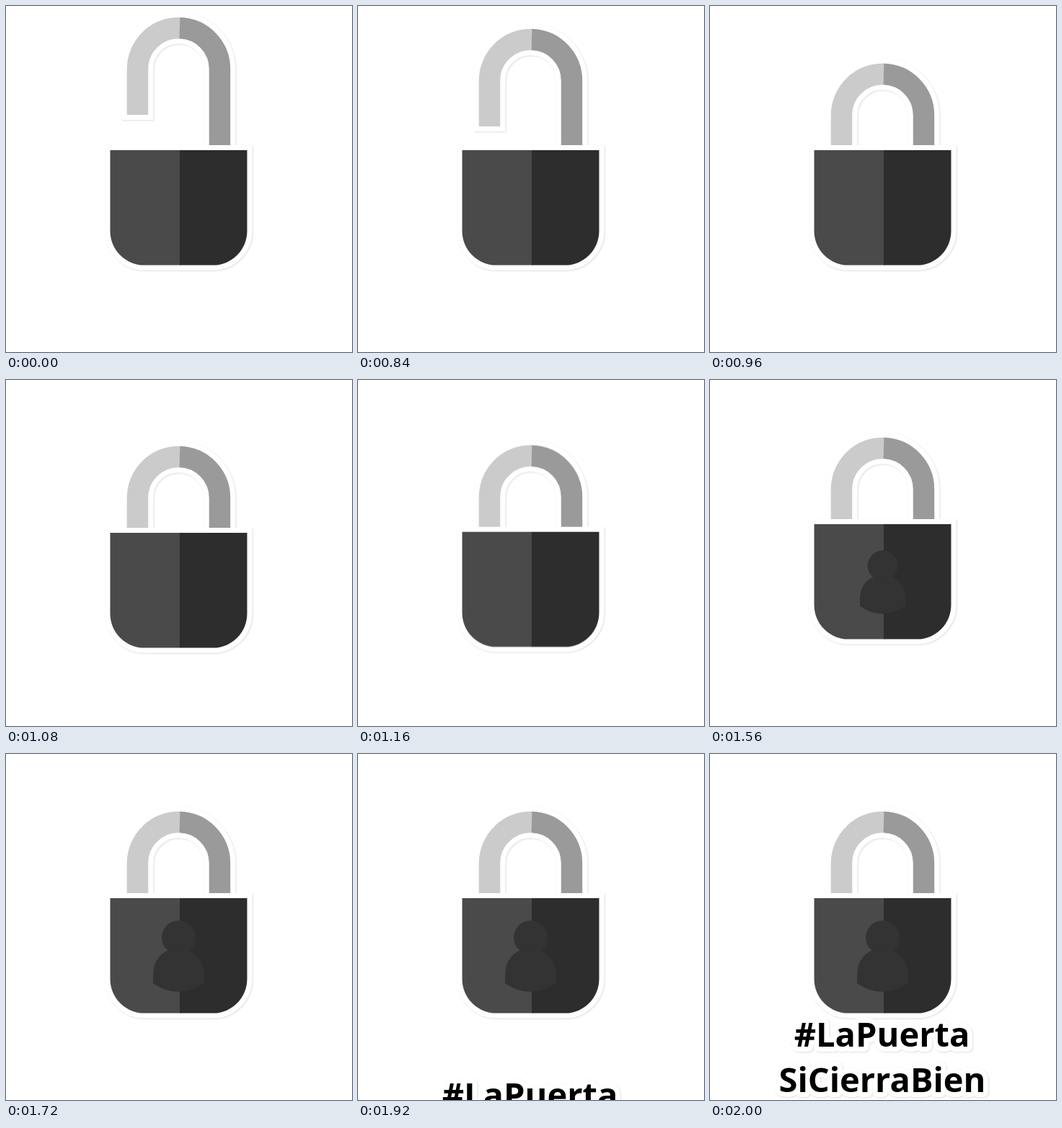
An HTML page without scripts for the animation above (5000 ms loop, 480 by 480 pixels).

```html
<!DOCTYPE html>
<html lang="es">
<head>
<meta charset="utf-8">
<title>Candado</title>
<style>
  html, body { margin: 0; width: 100%; height: 100%; overflow: hidden; background: #fff; }
  svg { display: block; width: 100%; height: 100%; }

  .sticker { filter: drop-shadow(1px 1px .8px rgba(0, 0, 0, .13)); }
  .shackle path { fill: none; stroke-width: 29.5px; }
  .shackle .rim { stroke: #fff; stroke-width: 43.5px; }
  .body .rim { fill: #fff; stroke: #fff; stroke-width: 14px; }

  text {
    font: 700 47px "Noto Sans", sans-serif;
    text-anchor: middle;
    fill: #000;
    stroke: #fff;
    stroke-width: 14px;
    stroke-linejoin: round;
    paint-order: stroke;
  }

  .lock, .shackle, .person, .slogan { animation: 5s -1ms infinite linear; }
  .lock { animation-name: bounce; }
  .shackle { animation-name: close; }
  .person { animation-name: pop; transform-origin: 239.5px 280.5px; }
  .slogan { animation-name: rise; }

  /* The motion advances in 40 ms steps */
  @keyframes close {
    0% { transform: none; }
    16.8% { transform: translateY(0); animation-timing-function: steps(4, start); }
    20%, 100% { transform: translateY(64px); }
  }
  @keyframes bounce {
    0% { transform: translateY(0); }
    20% { transform: translateY(0); animation-timing-function: steps(4, start); }
    23.2% { transform: translateY(16px); animation-timing-function: steps(3, start); }
    25.6%, 100% { transform: translateY(0); }
  }
  @keyframes pop {
    0% { transform: scale(0); }
    29.6% { transform: scale(0); animation-timing-function: steps(4, start); }
    32.8% { transform: scale(1.185); animation-timing-function: steps(3, start); }
    35.2%, 100% { transform: scale(1); }
  }
  @keyframes rise {
    0% { transform: translateY(126px); }
    38.4% { transform: translateY(126px); animation-timing-function: steps(3, start); }
    40.8%, 100% { transform: translateY(0); }
  }
</style>
</head>
<body>
<svg viewBox="0 0 480 480">
  <g class="lock">
    <g class="shackle">
      <g class="sticker">
        <path class="rim" d="M182.5 158V87.5A57 57 0 0 1 296.5 87.5V230"/>
        <path stroke="#cbcbcb" d="M182.5 151V87.5A57 57 0 0 1 242 30.5"/>
        <path stroke="#9a9a9a" d="M241 30.5A57 57 0 0 1 296.5 87.5V230"/>
      </g>
    </g>
    <g class="body sticker">
      <path class="rim" d="M144.5 200H334.5V312A47 47.5 0 0 1 287.5 359.5H191.5A47 47.5 0 0 1 144.5 312Z"/>
      <path fill="#4a4a4a" d="M144.5 200H242V359.5H191.5A47 47.5 0 0 1 144.5 312Z"/>
      <path fill="#2d2d2d" d="M241 200H334.5V312A47 47.5 0 0 1 287.5 359.5H241Z"/>
    </g>
    <g class="person" fill="#333">
      <circle cx="239.5" cy="254.5" r="23.5"/>
      <path d="M204 318V307C204 289 213 277 226 272H253C266 277 275 289 275 307V318Q239.5 342 204 318Z"/>
    </g>
  </g>
  <g class="slogan">
    <g class="sticker">
      <text x="238.5" y="406">#LaPuerta</text>
      <text x="239" y="468.5">SiCierraBien</text>
    </g>
  </g>
</svg>
</body>
</html>
```
